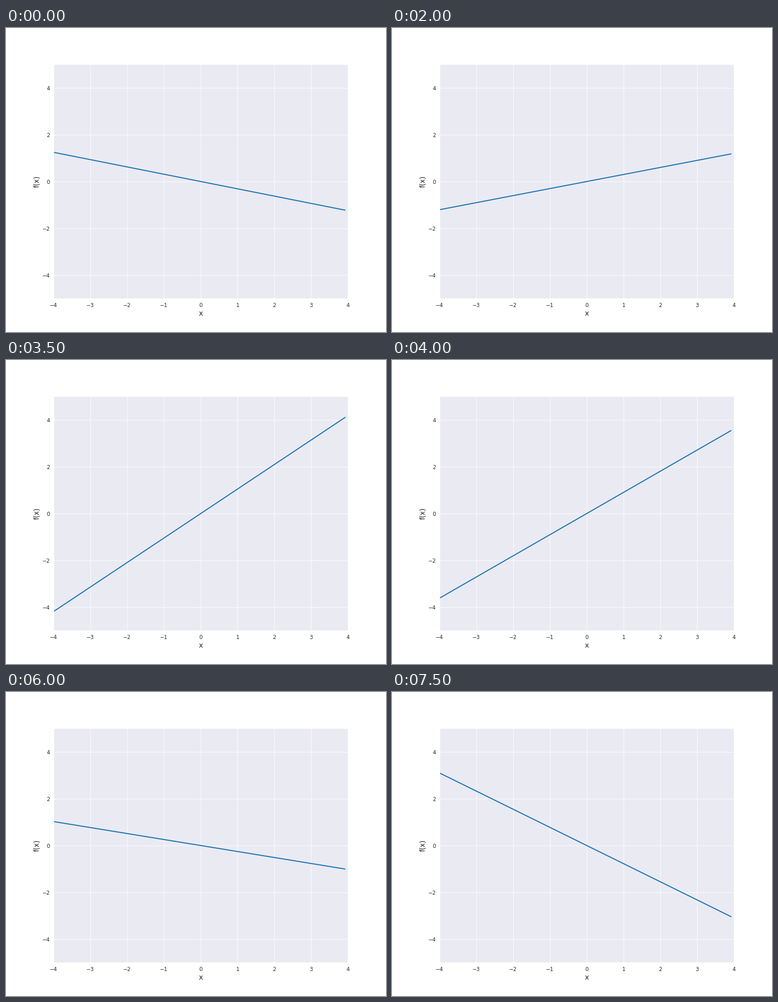
Recreate the animation shown at these times as a matplotlib script. Size 837 by 669 pixels, loop 8000 ms.

```python
import numpy as np
import matplotlib.pyplot as plt
from matplotlib.animation import FuncAnimation

W, H, DPI = 837, 669, 72  # at 72 dpi one point is one pixel
PT = W / 720              # the plot is laid out as a 10 inch wide figure
INK = "#262626"

plt.rcParams["font.family"] = "DejaVu Sans"

# Random draws of the weight w in f(x) = w * x
SLOPES = [-0.312, 1.5, 0.536, 0.739, 0.301, -0.1, -1.775, 1.047,
          0.904, -0.166, 0.162, 1.5, -0.256, -1.5, 0.3, -0.775]

fig = plt.figure(figsize=(W / DPI, H / DPI), dpi=DPI, facecolor="white")
ax = fig.add_axes([0.125, 0.11, 0.775, 0.77], facecolor="#EAEAF2")
ax.set(xlim=(-4, 4), ylim=(-5, 5),
       xticks=range(-4, 5), yticks=range(-4, 5, 2))
ax.set_axisbelow(True)
ax.grid(color="white", lw=0.8 * PT)
ax.tick_params(length=0, pad=7 * PT, labelsize=10 * PT, labelcolor=INK)
for spine in ax.spines.values():
    spine.set(color="white", linewidth=0.8 * PT)

label = dict(fontsize=13 * PT, color=INK, labelpad=4 * PT)
ax.set_xlabel("x", **label)
ax.set_ylabel("f(x)", **label)

x = np.arange(100) * 0.08 - 4
line, = ax.plot(x, SLOPES[0] * x, color="#1f77b4", lw=2 * PT,
                solid_capstyle="round")


def update(i):
    line.set_ydata(SLOPES[i] * x)
    return line,


anim = FuncAnimation(fig, update, frames=len(SLOPES), interval=500,
                     repeat=True, repeat_delay=0)
plt.show()
```
